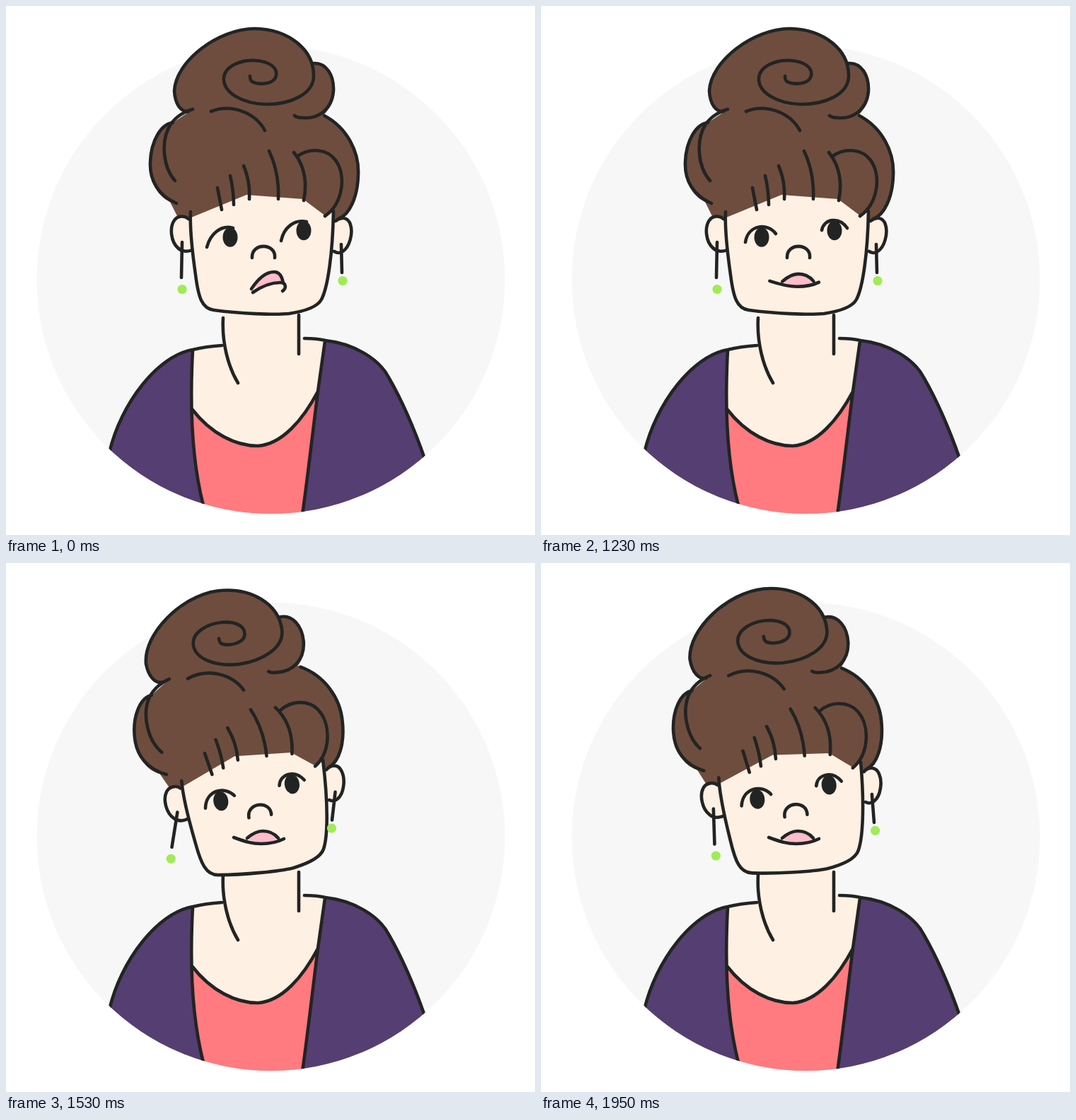
These frames come from a looping animation (748x748 px, 2.94 s). An HTML page:

```html
<!DOCTYPE html>
<html>
<head>
<meta charset="utf-8">
<style>
  html, body { margin: 0; width: 100%; height: 100%; overflow: hidden; background: #fff; }
  svg { display: block; width: 100vw; height: 100vh; }
  .ink { fill: none; stroke: #222423; stroke-width: 4.6; stroke-linecap: round; stroke-linejoin: round; }
  .skin { fill: #fef0e3; }
  .hair { fill: #6e4d3e; }
  .coat { fill: #553e71; }
  .bead { fill: #9fec57; }
</style>
</head>
<body>
<svg viewBox="0 0 748 748">
  <clipPath id="disc"><circle cx="374.5" cy="387" r="331"/></clipPath>
  <circle cx="374.5" cy="387" r="331" fill="#f7f7f7"/>

  <g clip-path="url(#disc)">
    <path class="skin" d="M307 428C306 450 306 465 308 480L264 487V640H430L452 473L414 470V428Z"/>
    <path fill="#ff7b7f" d="M263 570C290 605 325 622 356 622C390 620 420 585 441 545L419 730H282C268 670 264 620 263 570Z"/>
    <path class="coat" d="M264 486C215 494 162 562 146 632L140 740H288L279 706C262 640 260 560 264 487Z"/>
    <path class="coat" d="M452 473C490 477 527 498 541 525C560 558 578 600 592 640V740H416L419 716C428 655 434 600 441 545Z"/>
    <path class="ink" d="M305 480C290 481 276 483 264 486C215 494 162 562 146 632
      M422 470C435 470 444 471 452 473C490 477 527 498 541 525C560 558 578 600 592 640
      M264 487C260 560 262 640 279 706M451 474L441 545C434 600 428 655 419 720
      M263 570C290 605 325 622 356 622C390 620 420 585 441 545
      M307 441C305 475 314 510 328 533M414 437V492"/>
  </g>

  <g id="head">
    <path class="skin" d="M261 291C260 310 263 345 268 380C272 412 277 428 294 430C330 435 380 437 400 435C420 432 440 426 446 415C455 398 462 350 463 290L420 262H340Z"/>
    <path class="hair" d="M243 299L232 277C212 268 203 246 204 221C205 190 220 166 236 165L264 146L300 135H420L450 155C482 172 500 206 498 240C497 270 486 295 470 301L462 305V290L452 297L420 273L340 267L262 299Z"/>
    <path class="skin" d="M258 301C253 296 243 296 238 303C231 313 233 333 243 342C248 347 256 348 263 345Z"/>
    <path class="skin" d="M463 304C474 297 484 299 487 309C491 321 486 341 476 347C472 350 467 349 464 347Z"/>
    <g id="bun">
      <path class="hair" d="M258 149C248 150 241 142 238 120C240 78 300 32 352 32C395 33 425 55 434 81C453 80 464 98 463 120C461 146 448 157 440 160L300 175Z"/>
      <path class="ink" d="M258 149C248 150 239 140 238 120C240 78 300 32 352 32C400 33 436 62 435 100C434 125 402 139 368 139C333 138 307 122 308 102C309 85 332 76 352 77C372 78 384 87 382 98C380 111 358 112 348 107C345 105 345 102 345 99
        M435 81C453 80 464 98 463 120C461 146 442 160 420 158C414 158 410 157 408 155"/>
    </g>
    <path class="ink" d="M241 279C215 268 203 246 204 221C205 190 220 166 236 165
      M239 247C222 228 218 190 233 167C240 157 252 149 264 146
      M450 155C482 172 500 206 498 240C497 270 486 295 470 301
      M413 212C430 200 454 202 466 218C482 240 476 280 451 297
      M299 257L305 288M317 240C320 253 322 267 322 281M336 226C342 240 345 256 344 273
      M372 205C382 226 386 250 385 273M407 207C422 226 426 250 421 275
      M290 149C318 138 352 150 366 176
      M258 301C253 296 243 296 238 303C231 313 233 333 243 342C248 347 256 348 263 345
      M466 304C474 297 484 299 487 309C491 321 486 341 476 347C472 350 467 349 464 347
      M261 291C260 310 263 345 268 380C272 412 277 428 294 430C330 435 380 437 400 435C420 432 440 426 446 415C455 398 462 350 463 290
      M348 356C347 334 382 335 380 356"/>
    <g id="eyes"></g>
    <g id="ringL"><path class="ink" d="M249 334L248 384"/><circle class="bead" cx="249" cy="400.5" r="6.6"/></g>
    <g id="ringR"><path class="ink" d="M474 337L475 377"/><circle class="bead" cx="476" cy="388.5" r="6.6"/></g>
  </g>

  <path id="tongue" fill="#ffbccb"/>
  <path id="lips" class="ink"/>
</svg>

<script>
const LOOP = 2940, STEP = 30;
const $ = id => document.getElementById(id);
const clamp = x => Math.min(1, Math.max(0, x));
const smooth = x => (1 - Math.cos(Math.PI * clamp(x))) / 2;

// Blends two paths of equal structure.
function mix(a, b, k) {
  const to = b.match(/[\d.]+/g);
  let i = 0;
  return a.replace(/[\d.]+/g, v => +v + (to[i++] - v) * k);
}

// Eased value between [time, value] keys.
function track(keys, t) {
  let value = keys[0][1];
  for (let i = 1; i < keys.length; i++) {
    const [t0, v0] = keys[i - 1], [t1, v1] = keys[i];
    if (t >= t0) value = v0 + (v1 - v0) * smooth((t - t0) / (t1 - t0));
  }
  return value;
}

const eyes = [
  { x: 317, y: 327, shift: 5,
    aside: 'M284 341C289 322 304 309 321 314',
    half: 'M285 339C295 318 313 315 328 329',
    closed: 'M286 336C296 349 317 349 328 336',
    ahead: 'M289 334C293 309 320 306 332 322' },
  { x: 421, y: 317.5, shift: 6,
    aside: 'M389 332C393 313 408 301 425 305',
    half: 'M390 330C399 313 417 308 431 321',
    closed: 'M391 327C401 340 421 340 431 327',
    ahead: 'M397 317C400 301 421 297 433 314' }
];

const mouth = {
  upper: ['M347 400C355 388 366 376 379 376C388 376 391 386 392 392',
          'M341 389C348 383 355 379 363 379C372 379 380 383 385 389'],
  base: ['Q370 392 347 400', 'Q363 404 341 389'],
  lower: ['M349 405C362 396 376 391 388 391C396 391 397 399 391 403',
          'M322 388C338 394 348 397 361 397C374 397 385 394 393 390']
};

const bunKeys = [[1380, 0], [1620, -5], [1650, -5], [1950, 0]];
const ringKeys = [[1410, 0], [1530, -16], [1650, 9], [1950, -3]];
const settleKeys = [[1500, 8.3], [1650, 6]];

// Lid closure: 90 ms down, 30 ms shut, 90 ms up.
const blink = t => clamp(Math.min(t / 90, (210 - t) / 90));

function drawEye(eye, closure, ahead) {
  const open = ahead ? eye.ahead : eye.aside;
  const lid = closure < 1 / 3
    ? mix(open, eye.half, closure * 3)
    : mix(eye.half, eye.closed, (closure * 3 - 1) / 2);
  const x = eye.x - (ahead ? eye.shift : 0);
  const left = lid.match(/[\d.]+/)[0];
  return `<ellipse cx="${x}" cy="${eye.y}" rx="10.5" ry="13.7" fill="#222423"/>
    <path class="skin" d="${lid}V${eye.y - 24}H${left}Z"/><path class="ink" d="${lid}"/>`;
}

function draw(t) {
  const angle = t < 1500 ? 8.3 * clamp((t - 1230) / 270) ** 2.4 : track(settleKeys, t);
  $('head').setAttribute('transform', `rotate(${-angle} 376 390)`);
  $('bun').setAttribute('transform', `translate(${track(bunKeys, t)} 0)`);

  const swing = -track(ringKeys, t);
  $('ringL').setAttribute('transform', `rotate(${swing} 249 334)`);
  $('ringR').setAttribute('transform', `rotate(${swing} 474 337)`);

  const closure = Math.max(blink(t - 60), blink(t - 960));
  $('eyes').innerHTML = eyes.map(eye => drawEye(eye, closure, t >= 1080)).join('');

  const k = smooth((t - 1050) / 210);
  const [upper, base, lower] = [mouth.upper, mouth.base, mouth.lower].map(([a, b]) => mix(a, b, k));
  $('tongue').setAttribute('d', upper + base + 'Z');
  $('lips').setAttribute('d', upper + lower);
}

const start = performance.now();
function frame() {
  const t = (performance.now() - start) % LOOP;
  draw(Math.floor(t / STEP) * STEP);
  requestAnimationFrame(frame);
}
frame();
</script>
</body>
</html>
```
